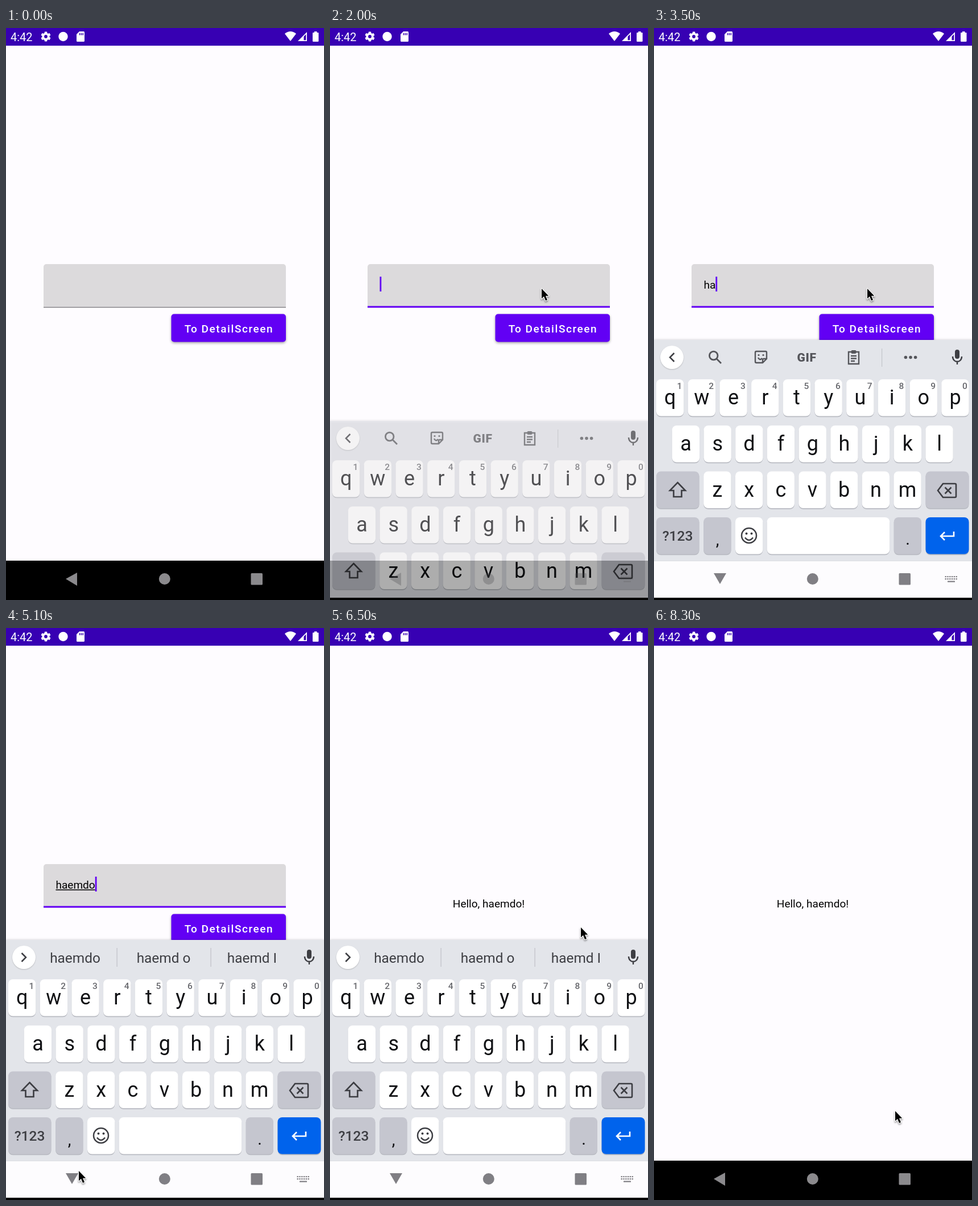
Recreate the animation shown at these times as an HTML page with a canvas. Size 559 by 1003 pixels, loop 8.5 s.

```html
<!DOCTYPE html>
<html lang="en">
<head>
<meta charset="utf-8">
<title>Text field demo</title>
<style>
html, body { margin: 0; width: 100%; height: 100%; overflow: hidden; background: #fefcff; }
canvas { display: block; }
</style>
</head>
<body>
<canvas id="stage" width="559" height="1003"></canvas>
<script>
const W = 559, H = 1003, LOOP = 8500, STEP = 100;
const NAME = 'haemdo';
const PAGE = '#fefcff', ACCENT = '#6200f4', INK = '#3d3e43';
const TYPED_AT = [2900, 3300, 3600, 3700, 3900, 4000];
const FOCUS = 1600, SUGGEST = 3700, CLICK = 6000, SWITCH = 6200, CLOSE = 6600;

const POINTER = [
  [100, 539, 767], [200, 495, 709], [300, 495, 709], [700, 430, 560], [1200, 372, 457],
  [2700, 372, 457], [2800, 375, 457], [4200, 375, 457], [4500, 205, 880], [4800, 140, 948],
  [5100, 128, 952], [5200, 128, 952], [5600, 290, 730], [5900, 441, 525], [6700, 441, 525],
  [7000, 418, 610], [7500, 416, 866], [7900, 420, 866], [8100, 441, 838], [8300, 424, 847]
];
// time, keyboard offset, keyboard opacity
const SLIDE = [
  [1800, 452, 0], [1900, 330, .2], [2000, 142, .68], [2100, 22, .95], [2200, 0, 1],
  [6500, 0, 1], [6600, 62, .78], [6700, 234, .18], [6800, 452, 0]
];

const main = document.getElementById('stage').getContext('2d');
const panel = document.createElement('canvas');
panel.width = W;
panel.height = H;
const kb = panel.getContext('2d');
let c = main;

function track(keys, t) {
  if (t <= keys[0][0]) return keys[0].slice(1);
  for (let i = 1; i < keys.length; i++) {
    const a = keys[i - 1], b = keys[i];
    if (t <= b[0]) {
      const p = (t - a[0]) / (b[0] - a[0]);
      return a.slice(1).map((v, j) => v + (b[j + 1] - v) * p);
    }
  }
  return keys[keys.length - 1].slice(1);
}

function rect(x, y, w, h, color, r = 0) {
  c.fillStyle = color;
  c.beginPath();
  c.roundRect(x, y, w, h, r);
  c.fill();
}

function disc(x, y, r, color) {
  c.fillStyle = color;
  c.beginPath();
  c.arc(x, y, r, 0, Math.PI * 2);
  c.fill();
}

function shape(d, x, y, color, width = 0, scale = 1) {
  c.save();
  c.translate(x, y);
  c.scale(scale, scale);
  const path = new Path2D(d);
  if (width) {
    c.strokeStyle = color;
    c.lineWidth = width;
    c.stroke(path);
  } else {
    c.fillStyle = color;
    c.fill(path, 'evenodd');
  }
  c.restore();
}

function text(s, x, y, size, color, { weight = 400, align = 'center', spacing = 0 } = {}) {
  c.font = `${weight} ${size}px Roboto, sans-serif`;
  c.textAlign = align;
  c.letterSpacing = spacing + 'px';
  c.fillStyle = color;
  c.fillText(s, x, y);
  c.letterSpacing = '0px';
}

function shadow(color, blur, y, draw) {
  c.save();
  c.shadowColor = color;
  c.shadowBlur = blur;
  c.shadowOffsetY = y;
  draw();
  c.restore();
}

function gear(x, y) {
  for (let i = 0; i < 6; i++) {
    c.save();
    c.translate(x, y);
    c.rotate(i * Math.PI / 3);
    rect(-2.3, -8.6, 4.6, 5, '#fff', 1);
    c.restore();
  }
  disc(x, y, 6.6, '#fff');
  disc(x, y, 2.9, '#3700b3');
}

function statusBar() {
  rect(0, 0, W, 31, '#3700b3');
  text('4:42', 8, 22.5, 20, '#fff', { align: 'left' });
  gear(70, 15);
  disc(100.5, 15, 8.2, '#fff');
  shape('M5 0H12.5Q14 0 14 1.5V16.5Q14 18 12.5 18H1.5Q0 18 0 16.5V5Z M4.7 3V6.5H6.3V3Z M7.6 3V6.5H9.2V3Z M10.5 3V6.5H12.1V3Z', 124, 6, '#fff');
  shape('M0 4Q10 -4 20 4L10 17Z', 490, 6, '#fff');
  shape('M16 0V16H0Z M14.3 4V14.3H10.5V8Z', 513, 7, '#fff');
  rect(539, 8, 10.5, 16, '#fff', 1.3);
  rect(542, 6, 4.5, 3, '#fff');
}

function navIcons(color, down) {
  shape(down ? 'M105 956H127L116 975Z' : 'M105 966L125 955V978Z', 0, 0, color);
  disc(278.8, 966, 10, color);
  rect(430.5, 956, 20.5, 20.5, color, 1.5);
}

function keyboardIcon(color) {
  for (let row = 0; row < 2; row++)
    for (let i = 0; i < 6; i++) rect(511.5 + i * 3.8, 961 + row * 4, 2.4, 2.2, color);
  rect(516, 969.5, 13, 2.2, color);
}

function form(t) {
  const focused = t >= FOCUS;
  rect(66, 414, 426, 76, '#dcdadc', [5, 5, 0, 0]);
  if (focused) rect(66, 487.5, 426, 3, ACCENT);
  else rect(66, 489, 426, 1.5, '#88868a');

  const count = TYPED_AT.filter(at => t >= at).length;
  const word = NAME.slice(0, count);
  text(word, 87.5, 456.5, 19.04, '#000', { align: 'left' });
  const end = 87.5 + c.measureText(word).width;
  if (count > 2) rect(87.5, 458.6, end - 87.5, 1.4, '#000');
  const since = t - (count ? TYPED_AT[count - 1] : FOCUS);
  if (focused && Math.floor(since / 500) % 2 === 0) rect(end, 436, 2.8, 26, ACCENT);

  shadow('rgba(0,0,0,.35)', 4, 2, () => rect(290.5, 501.5, 201.5, 49, ACCENT, 5));
  if (t >= CLICK) rect(290.5, 501.5, 201.5, 49, 'rgba(255,255,255,.16)', 5);
  text('To DetailScreen', 392, 534, 19.04, '#fff', { weight: 500, spacing: 1.55 });
}

function key(x, y, w, color = '#fff') {
  rect(x, y + 1.3, w, 65, '#b9bbc2', 8);
  rect(x, y, w, 64.5, color, 8);
}

function letterRow(letters, x, y, digits) {
  [...letters].forEach((ch, i) => {
    const left = x + i * 55.7;
    key(left, y, 48.3);
    text(ch, left + 24.2, y + 44, 36, '#101114');
    if (digits) text((i + 1) % 10, left + 41, y + 17, 15.5, '#66676c', { weight: 500 });
  });
}

function mic() {
  rect(529, 564, 8, 16, INK, 4);
  shape('M525 576C525 588 541 588 541 576M533 585V590', 0, 0, INK, 2.4);
}

function chevron(right) {
  shadow('rgba(0,0,0,.2)', 2, 1, () => disc(31.5, 577.5, 20.5, '#fff'));
  shape(right ? 'M27.5 570L35 577.5L27.5 585' : 'M35.5 570L28 577.5L35.5 585', 0, 0, INK, 2.5);
}

function toolbar() {
  chevron(false);
  shape('M112 574.5A7.3 7.3 0 1 1 97.4 574.5A7.3 7.3 0 1 1 112 574.5M110 580L118 588', 0, 0, '#55565b', 2.8);
  shape('M180 567H196Q198 567 198 569V580L191 587H180Q178 587 178 585V569Q178 567 180 567ZM198 580H193Q191 580 191 582V587M183 578Q186 584 190 579', 0, 0, '#55565b', 2.4);
  disc(184, 573.5, 1.6, '#55565b');
  disc(192, 573.5, 1.6, '#55565b');
  text('GIF', 268.5, 584.8, 21, '#55565b', { weight: 900, spacing: .6 });
  shape('M342 568H360V589H342ZM346 575H356M346 579.5H356M346 584H353', 0, 0, '#55565b', 2.4);
  rect(346.5, 565, 9, 6, '#55565b', 2);
  rect(400, 562, 1.2, 32, '#c3c5ca');
  for (let i = -1; i < 2; i++) disc(451 + i * 8.6, 577.5, 2.8, '#55565b');
  mic();
}

function suggestions(t) {
  const word = NAME.slice(0, TYPED_AT.filter(at => t >= at).length);
  const stem = word.slice(0, -1);
  chevron(true);
  [word, stem + ' ' + word.slice(-1), stem + ' I'].forEach((s, i) =>
    text(s, 121.5 + i * 155.5, 587, 24.4, INK));
  rect(194.5, 561, 1.2, 33, '#bfc1c7');
  rect(359.5, 561, 1.2, 33, '#bfc1c7');
  mic();
}

function keyboard(t) {
  const dark = '#c5c6cf', closing = t >= CLOSE;
  rect(0, 547, W, 388, '#e3e5ea');
  rect(0, 934.5, W, 65, '#fdfcfe');
  rect(0, 934, W, 1, '#dcdde2');
  if (closing)
    for (let i = 0; i < 10; i++) text((i + 1) % 10, 27.5 + i * 55.7, 591, 32, '#101114');
  else if (t >= SUGGEST) suggestions(t);
  else toolbar();

  letterRow('qwertyuiop', 4, 616, !closing);
  letterRow('asdfghjkl', 31.8, 697);
  letterRow('zxcvbnm', 87.2, 777.5);

  key(4, 777.5, 75.5, dark);
  shape('M41.5 797L55 811H48.5V822H34.5V811H28Z', 0, 0, INK, 2.6);
  key(477.5, 777.5, 76, dark);
  shape('M508 799H529Q531 799 531 801V821Q531 823 529 823H508L499 811ZM511.5 805.5L522.5 816.5M522.5 805.5L511.5 816.5', 0, 0, INK, 2.6);

  key(4, 858, 75.5, dark);
  text('?123', 41.5, 899, 24.5, INK, { weight: 500 });
  key(87.2, 858, 48.3, dark);
  text(',', 111.5, 907, 29, '#101114');
  key(143, 858, 48.3);
  shape('M180 890A13 13 0 1 1 154 890A13 13 0 1 1 180 890M160 893.5Q167 902.5 174 893.5', 0, 0, INK, 2.5);
  disc(162.5, 886.5, 2, INK);
  disc(171.5, 886.5, 2, INK);
  key(198.7, 858, 215.5);
  key(421.7, 858, 48.3, dark);
  text('.', 446, 906, 29, '#101114');
  key(477.5, 858, 76, '#0063ec');
  shape('M527 883V891H504M511 884L504 891L511 898', 0, 0, '#fff', 2.6);
}

function slideKeyboard(t) {
  const [offset, alpha] = track(SLIDE, t);
  if (!alpha) return navIcons('#8b8a8d', false);
  c = kb;
  c.clearRect(0, 0, W, H);
  keyboard(t);
  c = main;
  c.save();
  c.beginPath();
  c.rect(0, 0, W, 999);
  c.clip();
  c.globalAlpha = alpha;
  shadow('rgba(0,0,0,.2)', 4, 0, () => c.drawImage(panel, 0, offset));
  c.restore();
  if (offset === 0) {
    navIcons('#807f84', true);
    keyboardIcon('#807f84');
  } else if (t < CLOSE) {
    navIcons('rgba(75,75,78,.3)', false);
    keyboardIcon('rgba(75,75,78,.2)');
  } else {
    navIcons('#b9b8bb', false);
  }
}

function pointer(t) {
  if (t < POINTER[0][0]) return;
  const [x, y] = track(POINTER, t);
  const arrow = 'M0 0V17.5L4 13.8L7 21L10 19.7L7 12.8H12.3Z';
  c.lineJoin = 'round';
  shadow('rgba(0,0,0,.4)', 3, 2, () => shape(arrow, x, y, '#fff', 2.4));
  shape(arrow, x, y, '#000');
  c.lineJoin = 'miter';
}

function draw(t) {
  rect(0, 0, W, H, PAGE);
  const swap = Math.min(1, Math.max(0, (t - SWITCH + 100) / 300));
  c.globalAlpha = 1 - swap;
  if (swap < 1) form(t);
  c.globalAlpha = swap;
  if (swap > 0) text(`Hello, ${NAME}!`, 279, 490, 19.04, '#000');
  c.globalAlpha = 1;
  statusBar();
  rect(0, 934, W, 69, '#000');
  slideKeyboard(t);
  pointer(t);
}

function tick() {
  draw(Math.floor((performance.now() % LOOP) / STEP) * STEP);
  requestAnimationFrame(tick);
}
tick();
</script>
</body>
</html>
```
